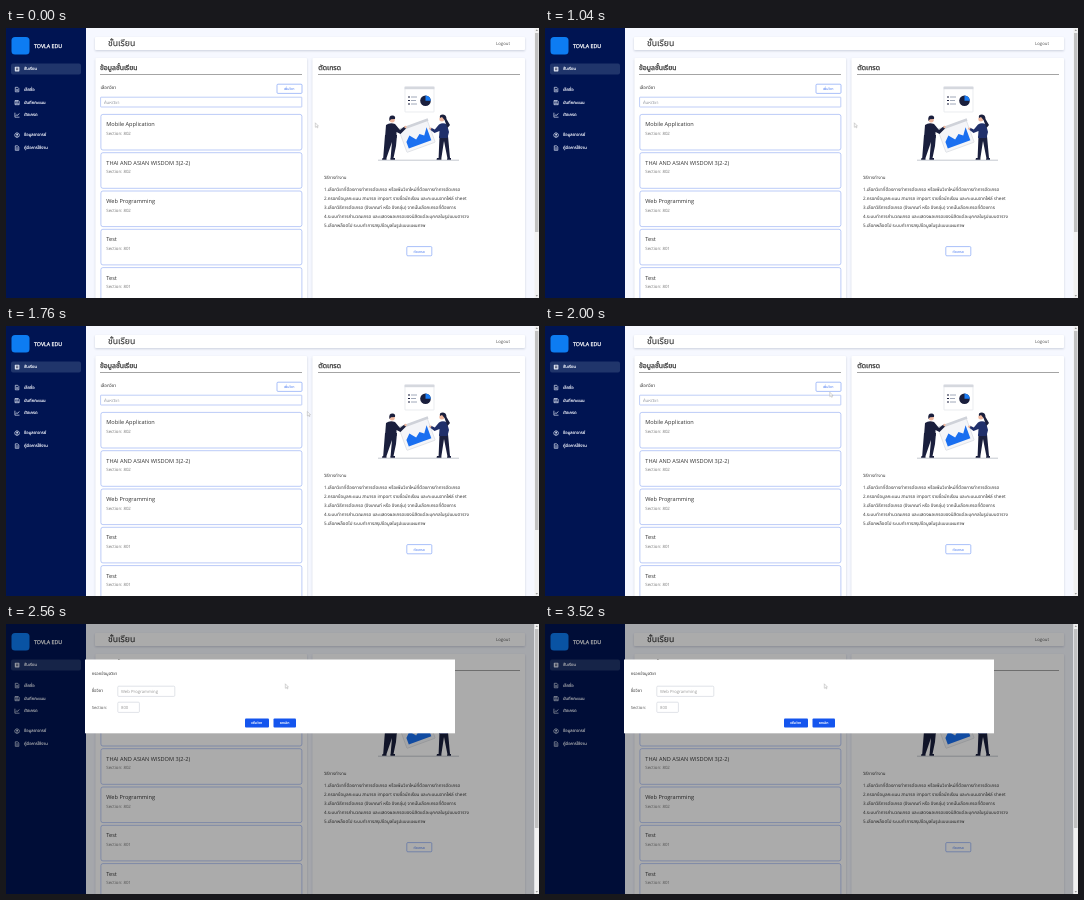
Recreate the animation shown at these times as an HTML page. Size 533 by 270 pixels, loop 3600 ms.

```html
<!DOCTYPE html>
<html lang="th">
<head>
<meta charset="utf-8">
<title>Classroom</title>
<style>
html, body { margin: 0; width: 100%; height: 100%; overflow: hidden; background: #f6f8ff; }
svg { display: block; width: 100vw; height: 100vh; }
text { font-family: 'Open Sans', 'Noto Sans Thai', 'Noto Sans', 'DejaVu Sans', sans-serif; text-rendering: geometricPrecision; }
</style>
</head>
<body>
<svg id="stage" viewBox="0 0 533 270"></svg>
<script>
const BLUE = '#1455ee', INK = '#333', GREY = '#777', NAVY = '#1a1f3d', SKIN = '#f0b9a0';
const LOOP = 3600, STEP = 80, MOVE_START = 1680, MOVE_END = 2240, HOVER = 2080, OPEN = 2560;

// Without a Thai font, fall back to the closely related Lao letters.
const probe = document.createElement('canvas').getContext('2d');
probe.font = '40px "Open Sans", "Noto Sans Thai", "Noto Sans", sans-serif';
const widthOf = s => probe.measureText(s).width;
const hasThai = widthOf('กี') < widthOf('ก') * 1.5;
const near = { ณ: 'น', ฑ: 'ท', ภ: 'ก', ธ: 'ร', ย: 'ญ', '็': '่' };
const letters = s => hasThai ? s : s.replace(/[\u0e01-\u0e4c]/g,
  c => String.fromCharCode((near[c] || c).charCodeAt(0) + 0x80));

const text = (x, y, size, s, fill = INK, heavy = 0) => {
  const fit = !hasThai && /[\u0e01-\u0e4c]/.test(s) ? 0.93 : 1;
  return `<text x="${x}" y="${y}" font-size="${size * fit}" fill="${fill}" stroke="${fill}" stroke-width="${heavy}">${letters(s)}</text>`;
};
const rect = (x, y, w, h, fill, stroke = 'none', rx = 0, extra = '') =>
  `<rect x="${x}" y="${y}" width="${w}" height="${h}" rx="${rx}" fill="${fill}" stroke="${stroke}" stroke-width=".6" ${extra}/>`;
const path = (d, fill, stroke = 'none', width = 0.7) =>
  `<path d="${d}" fill="${fill}" stroke="${stroke}" stroke-width="${width}"/>`;
const circle = (x, y, r, fill) => `<circle cx="${x}" cy="${y}" r="${r}" fill="${fill}"/>`;
const at = (x, y, s) => `<g transform="translate(${x} ${y})">${s}</g>`;

const line = d => path(d, 'none', '#d9e0f0');
const sheet = line('M.8 .3H3.2L4.3 1.5V4.8H.8ZM1.7 2.4H3.4M1.7 3.6H3.4');
const menu = [
  [41, 'ชั้นเรียน', rect(.3, .3, 4.6, 4.6, '#d9e0f0', 'none', .6) + path('M1.5 1.7H3.8M1.5 3.2H3.8', 'none', NAVY)],
  [61.5, 'เช็คชื่อ', sheet],
  [74.5, 'บันทึกคะแนน', line('M.5 .5H3.8L4.7 1.4V4.7H.5ZM1.4 .5V1.9H3.4V.5M1.4 4.6V3.2H3.7V4.6')],
  [87, 'ตัดเกรด', line('M.4 .2V4.7H5M1.2 3.6L2.3 2.1L3.2 2.9L4.8 .9')],
  [107, 'ข้อมูลอาจารย์', line('M2.6 .3A2.3 2.3 0 1 1 2.5 .3M1.1 4.2Q2.6 2.4 4.1 4.2') + circle(2.6, 1.9, .9, '#d9e0f0')],
  [120, 'คู่มือการใช้งาน', sheet],
];
const sidebar = rect(0, 0, 80, 270, '#001452') +
  rect(5.5, 9, 18, 17.5, '#0d7cf2', 'none', 3.5) +
  text(28, 19.9, 5.3, 'TOVLA EDU', '#fff', .25) +
  rect(5, 35.5, 70, 11, '#20356b', 'none', 2) +
  menu.map(([y, label, icon]) => at(8.5, y - 2.5, icon) + text(18, y + 1.4, 4.2, label, '#eef1fa', .15)).join('');

const panel = (x, y, w, h) => rect(x, y, w, h, '#fff', 'none', 1, 'filter="url(#shadow)"');
const outlined = (x, y, label) => rect(x, y, 25, 9.2, '#fff', '#6f95f5', 1) + text(x + 6.8, y + 5.9, 3.5, label, '#3f72f0');

const courses = [['Mobile Application', 802], ['THAI AND ASIAN WISDOM 3(2-2)', 802],
  ['Web Programming', 802], ['Test', 801], ['Test', 801]];
const course = ([title, section], i) => at(0, 86.4 + i * 38.3,
  rect(94.9, 0, 201, 35.6, '#fff', '#8ea8f2', 2) +
  text(100.3, 12, 5.6, title) + text(100.3, 20.8, 4.35, `Section: ${section}`, GREY));

const steps = [
  'เลือกวิชาที่ต้องการทำการตัดเกรด หรือเพิ่มวิชาใหม่ที่ต้องการทำการตัดเกรด',
  'กรอกข้อมูลคะแนน สามารถ import รายชื่อนักเรียน และคะแนนจากไฟล์ sheet',
  'เลือกวิธีการตัดเกรด (อิงเกณฑ์ หรือ อิงกลุ่ม) จากนั้นเลือกเกรดที่ต้องการ',
  'ระบบทำการคำนวณเกรด และแสดงผลเกรดของนิสิตแต่ละบุคคลในรูปแบบตาราง',
  'เลือกพล็อตไป ระบบทำการสรุปข้อมูลในรูปแบบแผนภาพ',
];

const charts = rect(399, 59, 29, 25, '#fff', '#dcdfe5', .5) + rect(398.6, 58.6, 29.8, 2.6, '#d5d8de') +
  circle(419.5, 72.8, 5.3, NAVY) + path('M419.5 72.8V67.5A5.3 5.3 0 0 1 424.8 72.8Z', '#1a7cf5') +
  path('M402 69H404M402 72.5H404M402 76H404', 'none', NAVY, 1.2) +
  path('M405 69H411M405 72.5H410M405 76H411', 'none', '#8a93a8', .8) +
  `<g transform="rotate(-20 411 108)">${rect(396, 96, 30, 24, '#f4f5f8', '#d5d8de', .5)}
   ${rect(395, 95, 32, 2.6, '#cfd2d9')}
   ${path('M399 117V110L404 105L409 111L414 107L418 110L423 103V117Z', '#1a6ff0')}</g>`;
const man = path('M379 107H391L390 118L387.5 130H384.6L386 114L380.5 130H377.2Z', NAVY) +
  path('M380 97Q384 94 389 96L394 102L398.5 98.5L400 100.5L394.5 106L390.5 104V110H379Z', NAVY) +
  circle(399.5, 99, 1.2, SKIN) + circle(386.2, 91.8, 2.6, SKIN) +
  path('M383.4 93Q382.5 87.6 386.5 87.6Q389.8 88 389 91L385 91.2Z', NAVY) +
  path('M376.5 130H380.5V131.8H376ZM384.4 130H389V131.8H384.4Z', NAVY);
const woman = path('M433.5 108H442L444 130H441.4L438 113L435.4 130H432.6Z', NAVY) +
  path('M433 96.5Q437 94 441 96.5L443 104L441.5 110H433L433.5 103L428.5 105L424 101.5L425.2 99.8L428.8 101.5Z', '#20306b') +
  circle(424.2, 100.6, 1.2, SKIN) + circle(435.8, 91, 2.5, SKIN) +
  path('M434 90Q433 86.6 437 86.6Q440.5 87 440.5 91L444 97L441.5 100L438.5 92L436 89Z', NAVY) +
  path('M431 130H435.4V131.8H430.5ZM441.4 130H445V131.8H441Z', NAVY);
const drawing = path('M372 132.2H453', 'none', '#9da3b0', .6) + charts + man + woman;

const page = rect(0, 0, 533, 270, '#f6f8ff') +
  panel(89, 9, 430, 13) + text(102, 18, 8.7, 'ชั้นเรียน', INK, .1) + text(490, 17, 4.3, 'Logout', '#555') +
  panel(89.5, 30, 211.5, 245) + panel(306.5, 30, 212.5, 245) +
  text(94, 42, 6.9, 'ข้อมูลชั้นเรียน', INK, .25) + text(312.3, 42, 7, 'ตัดเกรด', INK, .25) +
  path('M94 46.5H296M312 46.5H514', 'none', '#8d8d8d', .8) +
  text(94.4, 61, 4.55, 'เลือกวิชา') + outlined(271, 56.2, 'เพิ่มวิชา') +
  `<g id="hover">${rect(271, 56.2, 25, 9.2, '#1048d8', '#1048d8', 1)}${text(277.8, 62.1, 3.5, 'เพิ่มวิชา', '#fff')}</g>` +
  rect(94.6, 69.2, 201.2, 9.8, '#fff', '#94adf2', .5) + text(98, 75.6, 4.2, 'ค้นหาวิชา', '#8a8f99') +
  courses.map(course).join('') + drawing +
  text(318, 151.2, 4.4, 'วิธีการทำงาน') +
  steps.map((s, i) => text(318, 163.4 + i * 9, 4.55, `${i + 1}.${s}`)).join('') +
  outlined(400.8, 218.6, 'ตัดเกรด') + sidebar;

const solid = (x, w, label) => rect(x, 94.5, w, 9, BLUE, 'none', 1) + text(x + 6.3, 100.3, 3.6, label, '#fff', .1);
const modal = rect(0, 0, 528.5, 270, '#000', 'none', 0, 'fill-opacity=".33"') +
  rect(79, 35.5, 370, 73.8, '#fff') +
  text(85.7, 51.4, 4.25, 'กรอกข้อมูลวิชา') +
  text(85.7, 67.6, 4.4, 'ชื่อวิชา') + rect(111.8, 62.2, 57, 10.2, '#fff', '#ccd0d8', 1) +
  text(115, 69, 4.25, 'Web Programming', '#999') +
  text(85.7, 85.3, 4.2, 'Section:', '#555') + rect(111.8, 78.2, 21.6, 10.2, '#fff', '#ccd0d8', 1) +
  text(115, 85, 4.25, '800', '#999') +
  solid(239, 24, 'เพิ่มวิชา') + solid(267.5, 22.5, 'ยกเลิก');

const scrollbar = rect(528.5, 0, 4.5, 270, '#f1f1f1') + rect(529, 5, 3.5, 199, '#c1c1c1') +
  path('M529.6 2.8L530.8 1.4L532 2.8ZM529.6 267.2L530.8 268.6L532 267.2Z', '#777');
const arrow = path('M0 0V4.5L1.1 3.5L1.9 5.2L2.6 4.8L1.9 3.3H3.2Z', '#fff', '#aaa', .5);
const hand = path('M.4 .3V3L-.8 2.6L.5 5.3H3.4L4 2.5L1.4 1.8V.3Z', '#fff', '#333', .4);

const $ = id => document.getElementById(id);
$('stage').innerHTML = `<defs><filter id="shadow" x="-5%" y="-30%" width="110%" height="170%">
  <feDropShadow dx="0" dy="1" stdDeviation="1.3" flood-color="#8a94a8" flood-opacity=".4"/></filter></defs>
  ${page}<g id="modal">${modal}</g>${scrollbar}
  <g id="cursor"><g id="arrow">${arrow}</g><g id="hand">${hand}</g></g>`;
const show = (id, on) => $(id).setAttribute('visibility', on ? 'visible' : 'hidden');

function render(now) {
  const time = Math.floor(now % LOOP / STEP) * STEP;
  const p = Math.min(1, Math.max(0, (time - MOVE_START) / (MOVE_END - MOVE_START)));
  const eased = 1 - (1 - p) ** 2;
  const opened = time >= OPEN, hovered = time >= HOVER && !opened;
  $('cursor').setAttribute('transform', `translate(${309.3 - 30 * eased} ${94.8 - 35 * eased})`);
  show('hover', hovered);
  show('hand', hovered);
  show('arrow', !hovered);
  show('modal', opened);
  requestAnimationFrame(() => render(performance.now()));
}
render(performance.now());
</script>
</body>
</html>
```
